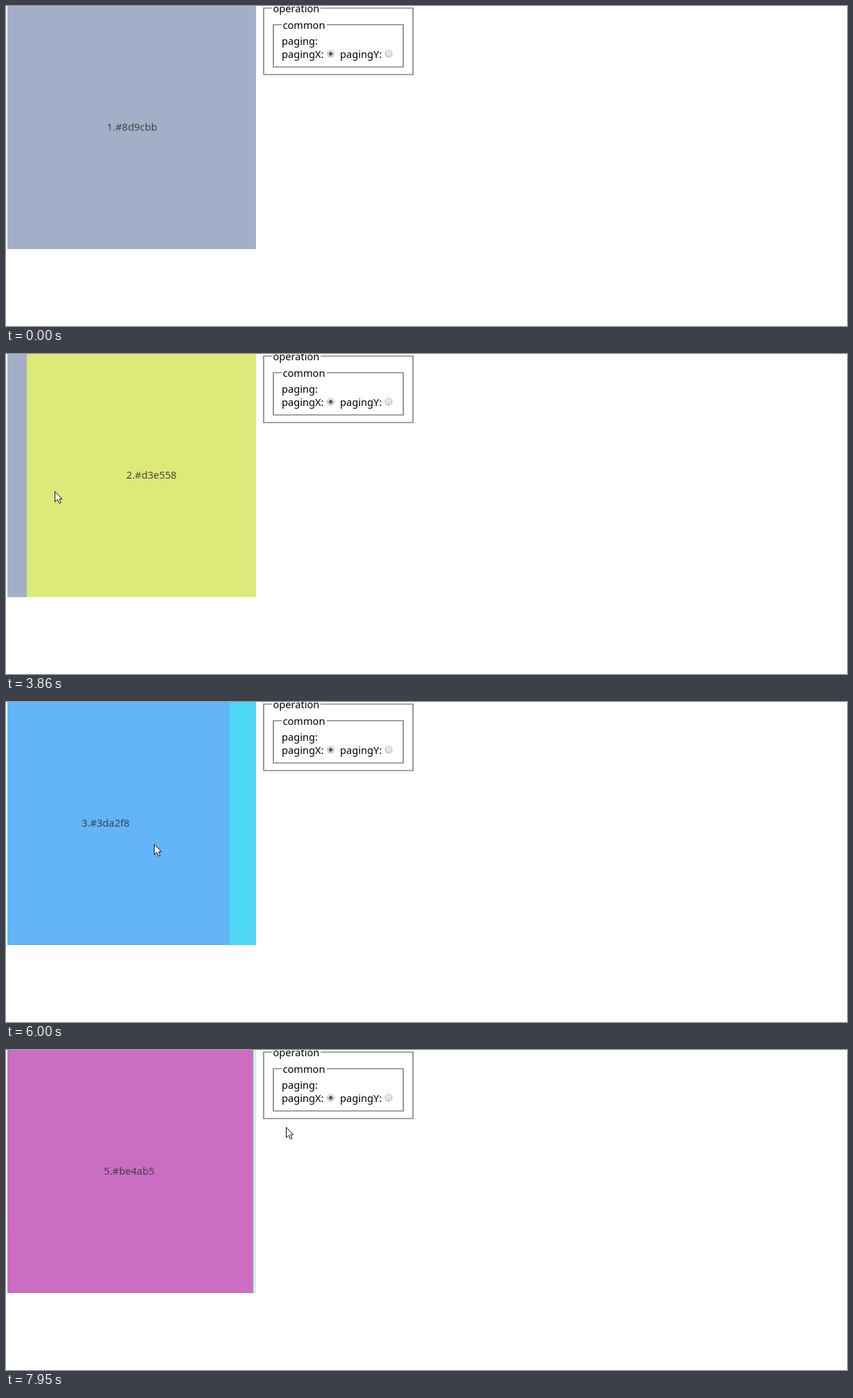
An HTML page that plays this animation: 1211x462 px, repeating every 8000 ms.

```html
<!DOCTYPE html>
<html>
<head>
<meta charset="utf-8">
<style>
  html, body { margin: 0; width: 100%; height: 100%; overflow: hidden; background: #fff; }
  svg { display: block; font: 14.6px "Noto Sans", "Open Sans", sans-serif; }
</style>
</head>
<body>
<svg width="1211" height="462" viewBox="0 0 1211 462">
  <defs>
    <clipPath id="view"><rect x="2" width="358" height="351"/></clipPath>
    <linearGradient id="knob" x2="0" y2="1">
      <stop stop-color="#f2f2f2"/><stop offset="1" stop-color="#dadada"/>
    </linearGradient>
  </defs>
  <g clip-path="url(#view)"><g id="track"></g></g>
  <path d="M383 3H371V99H586V3H453M397 27H385V88H572V27H462" fill="none" stroke="#868686" stroke-width="1.7"/>
  <text x="384.5" y="9">operation</text>
  <text x="398.5" y="33">common</text>
  <text x="397" y="56">paging:</text>
  <text x="397" y="75">pagingX:</text>
  <text x="481" y="75">pagingY:</text>
  <g fill="url(#knob)" stroke="#b0b0b0">
    <circle cx="467.5" cy="69" r="5"/>
    <circle cx="551" cy="69" r="5"/>
  </g>
  <circle cx="467.5" cy="69" r="2.7" fill="#555"/>
  <path id="cursor" d="M.5.5V15.5L4 12.2 6.4 17.5 8.9 16.4 6.5 11.3H10.8Z" fill="#fff" stroke="#111"/>
</svg>
<script>
const LOOP = 8000, STEP = 77.5, ORIGIN = 45, WIDTH = 358, SNAP = 1000;
const track = document.getElementById('track');
const cursor = document.getElementById('cursor');

const colors = ['#8d9cbb', '#d3e558', '#3da2f8', '#22cdf0', '#be4ab5', '#b9f2d5'];
track.innerHTML = colors.map((c, i) => `<g opacity=".8" transform="translate(${2 + i * WIDTH})">
  <rect width="${WIDTH}" height="351" fill="${c}" shape-rendering="crispEdges"/>
  ${i < 5 ? `<text x="179.5" y="180" text-anchor="middle" fill-opacity=".88">${i + 1}.${c}</text>` : ''}</g>`).join('');

const clamp = p => Math.max(0, Math.min(1, p));
const pull = p => p * p;
const glide = p => p * (2 - p);
const outBack = p => 1 + 2.70158 * (p - 1) ** 3 + 1.70158 * (p - 1) ** 2;

// Each swipe drags left from x, y, then the next page snaps in; "after" is where the pointer wanders
const swipes = [
  { press: 2915, release: 3552, drag: 96, x: 191, y: 188, after: [3842, 70, 198] },
  { press: 4605, release: 4648, drag: 55, x: 191, y: 207, after: [5315, 226, 206] },
  { press: 5480, release: 6207, drag: 70, x: 240, y: 205, after: [6555, 236, 196] },
  { press: 6830, release: 7050, drag: 63, x: 240, y: 196, after: [7400, 80, 188] }
];

const stops = [
  [1440, 1081, 446], [2370, 186, 192],
  ...swipes.flatMap(s => [[s.press, s.x, s.y], [s.release, s.x - s.drag, s.y, pull], s.after]),
  [7950, 403, 111]
];

function scrollAt(t) {
  let pos = 0;
  swipes.forEach(({ press, release, drag }, i) => {
    pos += drag * pull(clamp((t - press) / (release - press)));
    const stop = Math.min(t, swipes[i + 1]?.press ?? t);
    if (stop > release) pos += ((i + 1) * WIDTH - pos) * outBack(clamp((stop - release) / SNAP));
  });
  return pos;
}

function pointerAt(t) {
  const i = stops.findIndex(s => s[0] >= t);
  const [t1, x1, y1, ease = glide] = stops.at(i);
  const [t0, x0, y0] = stops[Math.max(0, i - 1)];
  const p = i > 0 ? ease((t - t0) / (t1 - t0)) : 1;
  return [Math.round(x0 + (x1 - x0) * p), Math.round(y0 + (y1 - y0) * p)];
}

function draw(now) {
  const t = ORIGIN + Math.floor((now % LOOP - ORIGIN) / STEP) * STEP;
  const shown = t >= stops[0][0];
  track.setAttribute('transform', `translate(${-Math.round(scrollAt(t))})`);
  cursor.style.display = shown ? '' : 'none';
  if (shown) cursor.setAttribute('transform', `translate(${pointerAt(t)})`);
  requestAnimationFrame(draw);
}
draw(0);
</script>
</body>
</html>
```
